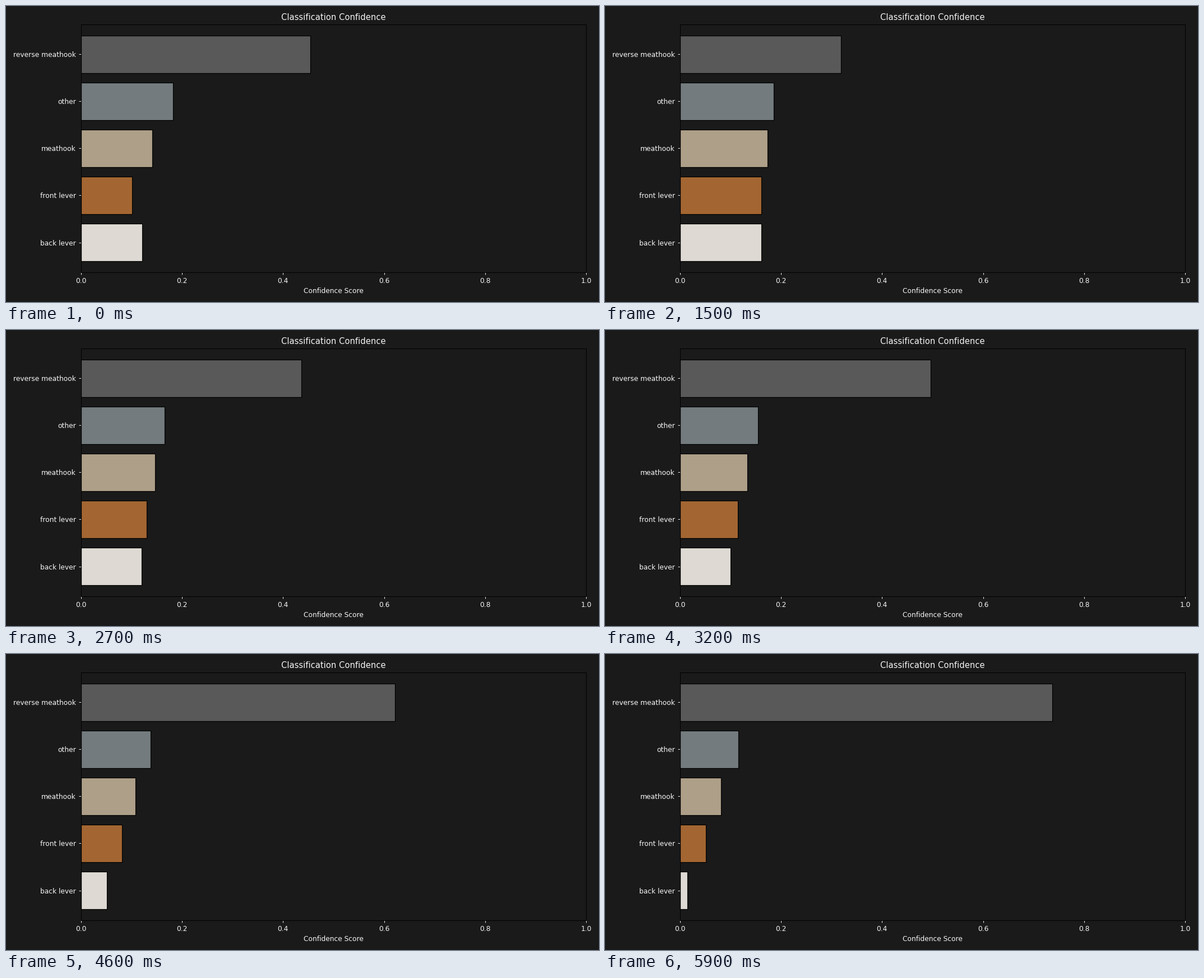
Recreate the animation shown at these times as a matplotlib script. Size 1058 px wide and 529 px high, loop 6 s.

```python
import matplotlib.pyplot as plt
import numpy as np
from matplotlib.animation import FuncAnimation

WIDTH, FIGSIZE = 1058, (12, 6)
FRAMES, INTERVAL = 60, 100
BACKGROUND, TEXT = "#1a1a1a", "#f5f5f5"

LABELS = ["back lever", "front lever", "meathook", "other", "reverse meathook"]
COLORS = ["#dedad3", "#a36632", "#ae9f89", "#737b7e", "#595959"]

FIRST = np.array([0.1208, 0.1014, 0.1417, 0.1818, 0.4545])
WARMUP = 7
LAST = FRAMES - 1

# The winner climbs unevenly; the other labels share what it leaves.
CLIMB_STEPS = [WARMUP, 14, 22, 32, 40, 51, LAST]
CLIMB_SCORES = [0.291, 0.311, 0.376, 0.4965, 0.589, 0.648, 0.737]
SHARES_START = np.array([0.241, 0.238, 0.253, 0.268])
SHARES_END = np.array([0.055, 0.196, 0.308, 0.438])


def scores(step):
    """Scores in label order, settling from the first ones like a running mean."""
    winner = np.interp(step, CLIMB_STEPS, CLIMB_SCORES)
    progress = max(0, (step - WARMUP) / (LAST - WARMUP))
    shares = SHARES_START + (SHARES_END - SHARES_START) * progress ** 2
    settled = np.append(shares * (1 - winner), winner)
    first_weight = max(0, ((WARMUP + 1) / (step + 1) - 1) / WARMUP)
    return settled + (FIRST - settled) * first_weight


plt.rcParams["font.family"] = "DejaVu Sans"
fig, ax = plt.subplots(figsize=FIGSIZE, dpi=WIDTH / FIGSIZE[0], facecolor=BACKGROUND)
ax.set_facecolor(BACKGROUND)
bars = ax.barh(LABELS, scores(0), color=COLORS, edgecolor="black")
ax.set_xlim(0, 1)
ax.set_xlabel("Confidence Score", color=TEXT)
ax.set_title("Classification Confidence", color=TEXT)
ax.tick_params(colors=TEXT)
fig.tight_layout()


def update(step):
    for bar, score in zip(bars, scores(step)):
        bar.set_width(score)
    return list(bars)


anim = FuncAnimation(fig, update, frames=FRAMES, interval=INTERVAL,
                     repeat=True, repeat_delay=0)
plt.show()
```
